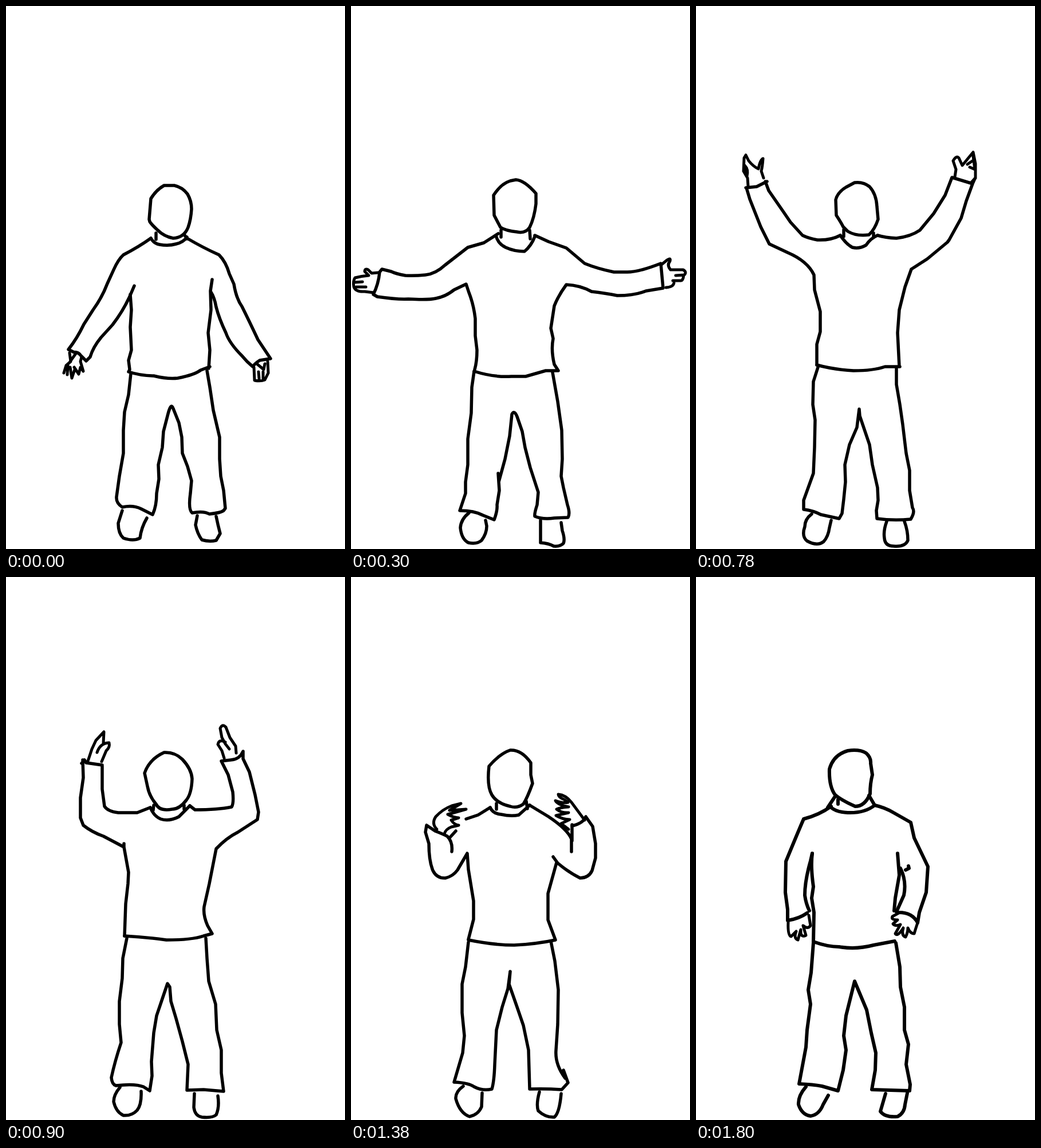
Recreate the animation shown at these times as an HTML page without scripts. Size 592 by 947 pixels, loop 2100 ms.

```html
<!DOCTYPE html>
<html lang="en">
<head>
<meta charset="utf-8">
<title>Arm swing</title>
<style>
html, body { margin: 0; width: 100%; height: 100%; overflow: hidden; background: #fff; }
svg { display: block; width: 100%; height: 100%; }
.pose {
  fill: none; stroke: #000; stroke-width: 5.5; stroke-linecap: round; stroke-linejoin: round;
  visibility: hidden;
  animation: show 2.1s step-end calc(var(--i) * 300ms) infinite;
}
.hand { stroke-width: 5; }
@keyframes show {
  0% { visibility: visible; }
  14.2858%, 100% { visibility: hidden; }
}
</style>
</head>
<body>
<svg viewBox="0 0 592 947">

<!-- arms down -->
<g class="pose" style="--i:0">
  <path d="M276 313L294 313Q308 316 317 328Q324 340 324 354Q323 372 318 386Q311 404 292 405Q276 402 265 391Q254 381 251 376L250 372L253 336Q262 321 276 313Z"/>
  <path d="M262 396V407M311 398L316 406M253 405Q258 414 268 416Q284 419 297 415Q310 412 316 403"/>
  <path d="M253 405Q232 420 205 434Q196 442 188 460L177 484Q168 508 152 530L136 555Q124 580 109 599L119 604Q126 603 131 610L140 619L147 612Q152 595 166 578L186 556Q206 530 218 502L224 488"/>
  <path d="M217 503L219 530L217 560L219 600L214 618L216 634L214 638Q236 645 258 645Q282 651 300 649Q330 643 340 635L356 629M360 477L357 497L358 530L353 570L356 600L354 632"/>
  <path d="M316 405Q345 422 372 434Q384 446 390 467L398 485Q402 510 412 524Q425 550 440 582Q452 600 462 615L443 618Q434 624 431 629Q420 620 412 610Q390 588 384 570Q372 545 367 525Q364 508 358 499"/>
  <path class="hand" d="M111 605L113 620L105 627L101 640M108 627L107 643M112 630L115 649L120 634M119 630L127 642L130 630L135 637L130 620L132 612M112 620L122 606"/>
  <path class="hand" d="M433 630L434 653Q445 655 452 652L458 640L457 620M441 638L442 650M449 638V650M438 624L450 634L452 624"/>
  <path d="M218 641L214 678L207 708L205 740V780L198 820L193 856Q192 867 203 874Q222 870 236 877L256 887Q263 872 263 850L267 825L266 800L273 770L275 742L282 715Q288 690 292 702L302 727L307 752L308 780L317 803L324 828L322 850Q318 878 325 884Q345 880 355 886Q375 884 380 880L383 876L380 845L375 820L373 790V752L362 705L356 665L351 636"/>
  <path d="M203 880L196 902Q196 920 205 928Q222 934 234 928Q236 910 246 893M334 889L331 905Q334 920 342 931Q355 935 367 932L374 920Q370 905 367 890"/>
</g>

<!-- arms out -->
<g class="pose" style="--i:1">
  <path d="M288 303Q303 304 323 327V345Q320 370 312 386Q305 397 290 394Q270 392 261 386L250 365L249 330Q262 310 278 305Z"/>
  <path d="M262 391V403M312 391L313 406M253 400Q256 414 270 421Q285 428 303 428Q315 418 321 402"/>
  <path d="M257 397L232 413L204 421L164 452Q148 467 130 469Q110 471 95 470Q78 467 70 463L54 459L50 464Q48 485 39 503L46 507Q80 512 100 511Q135 513 148 510Q165 507 180 495L201 485L206 500Q214 520 217 545V575L220 600Q220 620 216 634"/>
  <path d="M215 637Q250 648 280 646H305L340 636H362L355 625Q349 600 353 580L349 562L355 523Q362 505 376 486Q400 487 420 498Q445 501 465 505Q495 505 515 497L545 492L541 449Q500 465 480 464H459Q430 458 408 449L376 422L345 411L321 400"/>
  <path class="hand" d="M47 465L36 466L30 460Q24 457 24 463L31 470Q18 471 7 474Q3 480 5 490Q8 499 24 498L40 500M6 482L20 481M9 490H26"/>
  <path class="hand" d="M541 452L552 443Q559 438 557 445Q551 452 558 460H580Q587 464 582 469L567 470M581 469Q580 480 575 479H562M564 483Q563 490 550 491"/>
  <path d="M215 637L211 665L210 710L204 755V800L200 830V850L190 880Q215 880 230 888L250 896Q256 880 255 870L259 845L257 815M258 830L269 790L277 750L281 712Q285 704 290 716L299 742L304 770L313 805L327 848L325 870Q320 885 321 890Q335 896 355 893L379 892Q383 885 378 870L371 840L367 820L369 790L368 740L361 690L352 639"/>
  <path d="M206 884Q192 895 191 910Q193 930 205 936Q220 939 228 932Q237 920 237 907L235 897M331 897V936Q345 937 354 942Q366 943 371 937Q374 930 369 915L367 901"/>
</g>

<!-- arms up -->
<g class="pose" style="--i:2">
  <path d="M277 308Q292 306 303 315Q315 328 316 350L318 372Q312 390 302 399Q280 402 265 393L257 385Q253 377 245 365L244 338Q247 325 262 316Z"/>
  <path d="M258 390V402M310 396V404M252 400Q262 415 273 421Q285 424 297 417Q305 405 317 400"/>
  <path d="M252 400Q235 409 212 408Q196 405 186 400L165 377L152 358L127 322L121 306M88 317L94 337L113 385L128 415L160 430Q195 445 206 469L207 495L217 533V568L211 590V626M87 317L106 315L124 306"/>
  <path d="M211 626Q240 634 275 636Q310 636 330 629H356M355 629L352 570L355 530L365 490L376 459L404 441L439 412L442 408L463 370L472 340L483 310L487 301L480 309L447 299L435 330L415 362L391 391Q375 402 350 405Q330 404 317 400"/>
  <path class="hand" d="M91 314L90 300L83 288L84 265L87 260L92 270Q100 280 109 284Q112 268 117 266Q116 280 114 288L118 300M85 278Q92 285 89 297M88 290L84 282"/>
  <path class="hand" d="M452 298L454 285L449 270Q455 260 459 265L465 278L484 255L488 275V300M484 262L487 285L478 281M474 276L483 270"/>
  <path d="M213 630L205 655L204 695L208 722L207 770L205 815L188 862V878Q205 880 218 887L250 894L255 885L258 860L261 830L260 800L268 765L281 735L285 703L286 715L303 765L308 800L317 840L318 862L315 880L316 894Q345 898 375 895Q383 882 378 875L373 845V810L367 780L361 730L356 695L350 660V632"/>
  <path d="M202 886Q190 895 190 908Q184 925 194 933Q212 943 223 934Q231 925 233 910L236 897M333 899Q327 915 329 928Q330 942 345 942Q365 944 370 932Q370 915 364 899"/>
</g>

<!-- elbows bent -->
<g class="pose" style="--i:3">
  <path d="M276 306Q295 305 308 318Q324 335 325 352Q324 378 315 389Q303 405 290 405Q268 409 262 396Q250 382 247 365L242 342Q250 318 276 306Z"/>
  <path d="M258 398L257 407M311 398V405M252 402Q258 417 270 422Q285 427 302 418L321 399"/>
  <path d="M252 402L229 411H196Q178 409 172 400L168 370V330M134 319L135 350L130 385V420L135 433Q150 445 170 452L206 471V465M206 471L214 515L213 535L209 570L207 626M132 325L137 319L140 324L168 328"/>
  <path d="M207 626Q245 628 280 633Q325 633 345 626L360 622L352 608Q344 590 346 575L355 535L367 474Q385 455 405 445L439 423L441 410L435 380L425 340L414 317V304Q408 318 393 319L376 321L388 345L396 375Q398 395 394 401Q370 406 330 406L321 399"/>
  <path class="hand" d="M143 321L150 300L157 285L171 270L170 290M159 306Q164 290 180 289Q182 297 175 303L167 322"/>
  <path class="hand" d="M402 307L401 295L391 280L384 262Q378 255 374 264L377 280L383 291L390 300M383 288Q372 282 370 292L377 303L381 316"/>
  <path d="M211 630L204 665L203 700L198 740V780L201 812Q190 845 184 873Q185 885 192 887Q225 883 240 889L251 896L255 870L254 845L258 795L263 765L282 709L286 715L288 740L297 770L308 810L318 850L316 895L345 894L380 897L376 865V825L368 790L366 745L354 705L351 665L349 630"/>
  <path d="M199 890Q188 903 188 915Q192 933 205 939Q220 940 229 930Q237 920 236 897M329 901L328 925Q330 940 342 942Q360 944 367 938Q373 925 370 905"/>
</g>

<!-- hands at shoulders -->
<g class="pose" style="--i:4">
  <path d="M278 302Q298 301 314 324V345L317 360Q308 385 301 396Q290 404 278 400Q255 395 246 380Q237 365 241 330Q260 308 278 302Z"/>
  <path d="M254 395V405M306 391L308 404M243 402Q248 413 262 414Q280 418 293 415L312 398"/>
  <path d="M243 402L222 415L201 422M312 398L345 418Q378 440 385 457V479M386 432V460"/>
  <path d="M147 443L132 433L130 445L136 465Q136 495 143 512Q150 526 165 525Q178 522 186 511L203 482L205 510L214 565V597L205 632M147 443Q160 448 168 452Q178 462 176 479M172 455L183 443"/>
  <path d="M205 633Q250 642 285 642Q325 640 357 633L344 598V552L359 498M353 488L361 499Q380 515 400 525Q415 525 421 512L427 490V465L422 435L410 418Q405 430 386 434"/>
  <path class="hand" d="M150 440Q140 430 148 418Q160 405 176 399L192 395L172 407L201 405L180 411L169 414Q180 420 188 420L175 424Q180 432 188 433L175 436Q165 440 163 448"/>
  <path class="hand" d="M408 424L385 393Q375 380 362 379Q362 384 372 388L379 393Q370 395 357 390Q360 397 380 401Q365 402 359 405Q368 412 380 411L358 416Q370 423 382 423L367 430L380 440"/>
  <path d="M205 637L200 680L194 710V760L198 800L195 830L180 881Q205 882 215 889Q230 897 246 893Q250 880 251 850L254 790L264 750L274 718L278 688L276 710L290 750L301 782L310 825L312 893Q340 892 368 894L379 882L371 860M374 874Q356 850 358 825L361 780L362 720L356 670L349 635"/>
  <path d="M196 888Q182 898 183 910Q190 935 207 941Q222 938 228 924L229 900M329 898Q323 920 327 931Q340 943 355 942Q364 935 367 901"/>
</g>

<!-- hands at chest -->
<g class="pose" style="--i:5">
  <path d="M272 301Q290 301 300 311Q309 325 313 340Q308 375 297 395Q285 407 272 405Q250 400 241 382Q230 365 233 340Q240 306 272 301Z"/>
  <path d="M247 392L244 407M299 390L302 408M306 397L312 404M234 402Q240 415 255 420Q280 425 297 415Q305 408 316 400"/>
  <path d="M241 400L200 417Q185 425 178 439L148 470M316 407L350 415L372 430L397 465"/>
  <path d="M160 474Q145 468 138 472Q132 490 140 507Q150 525 163 519M159 478Q153 485 154 497Q156 507 165 515M388 470Q400 463 412 466Q425 475 427 492Q420 515 405 520Q390 520 382 512M386 472Q390 490 383 502"/>
  <path class="hand" d="M163 479L203 470Q204 477 190 482Q212 485 216 493Q205 495 187 492Q210 500 213 511Q200 510 190 503Q205 515 205 525L194 520Q190 525 184 527Q168 520 161 511Q156 495 163 479"/>
  <path class="hand" d="M388 472Q372 468 362 456Q352 452 352 459Q360 466 362 472L342 465Q338 470 356 481Q335 484 329 495Q345 496 357 489Q340 497 336 507Q350 507 362 495M350 517Q358 505 366 504L350 517M366 504L382 501"/>
  <path d="M201 527L207 555L205 600L203 631M201 630Q230 640 265 640Q310 640 340 630L353 625L346 590L348 550L352 527"/>
  <path d="M205 634L200 655L201 700L206 725L195 780L191 850L186 880Q190 890 200 888Q220 885 240 895L250 894Q255 870 266 835L265 800L259 770Q262 745 273 720Q280 695 283 715L290 735L298 765L309 805L305 850L307 892Q325 892 350 896Q370 898 375 890Q377 880 372 860L371 825L365 800L364 750L353 705L352 670L347 632"/>
  <path d="M193 893Q184 905 184 915Q185 935 197 941H222Q231 938 231 930V898M326 900Q320 908 321 914L339 942Q355 948 369 942Q372 925 360 904"/>
</g>

<!-- hands at hips -->
<g class="pose" style="--i:6;stroke-width:6">
  <path d="M265 303Q285 300 297 307Q306 315 305 325L308 345Q304 360 304 378Q295 400 278 400Q255 390 243 380Q232 365 233 335Q240 310 265 303Z"/>
  <path d="M244 381L230 402M248 388V396M302 381L312 398M236 402Q245 410 265 411Q295 412 312 398"/>
  <path d="M236 400Q215 415 188 422Q178 445 157 496L156 550L160 580V599Q180 596 194 586M203 482L200 495Q190 530 190 555Q192 570 198 582"/>
  <path d="M203 482Q200 505 205 540L202 560L206 585L205 636Q230 645 250 645Q280 650 310 642L347 635M352 482L355 520L348 560L346 582"/>
  <path d="M312 398Q330 402 345 411L375 428L381 455L405 505L402 550L390 585L387 603Q378 585 354 585M357 508Q368 530 363 555L350 584M371 504L372 508L366 511"/>
  <path class="hand" d="M161 602Q160 625 166 627L175 618Q170 630 178 633L183 615Q182 630 192 625L187 608Q195 615 200 608L197 590"/>
  <path class="hand" d="M354 586L343 592Q340 598 352 598L344 605Q348 610 357 606L348 622Q352 628 362 612Q358 625 366 628Q370 620 370 612Q374 622 381 622Q384 612 387 603"/>
  <path d="M205 638L201 690L196 720L200 745L194 790L192 820L180 884Q205 885 220 888L248 896L257 860L262 825L258 800L262 765L277 705L298 755L306 795L314 830L313 860L307 894Q340 895 373 896L374 885L367 850L371 815L364 790V750L357 715L356 680L349 638"/>
  <path d="M192 889Q178 905 179 920Q185 938 200 940Q215 938 222 920L231 904M331 901L322 932Q330 943 352 941Q364 935 365 920L369 900"/>
</g>
</svg>
</body>
</html>
```
